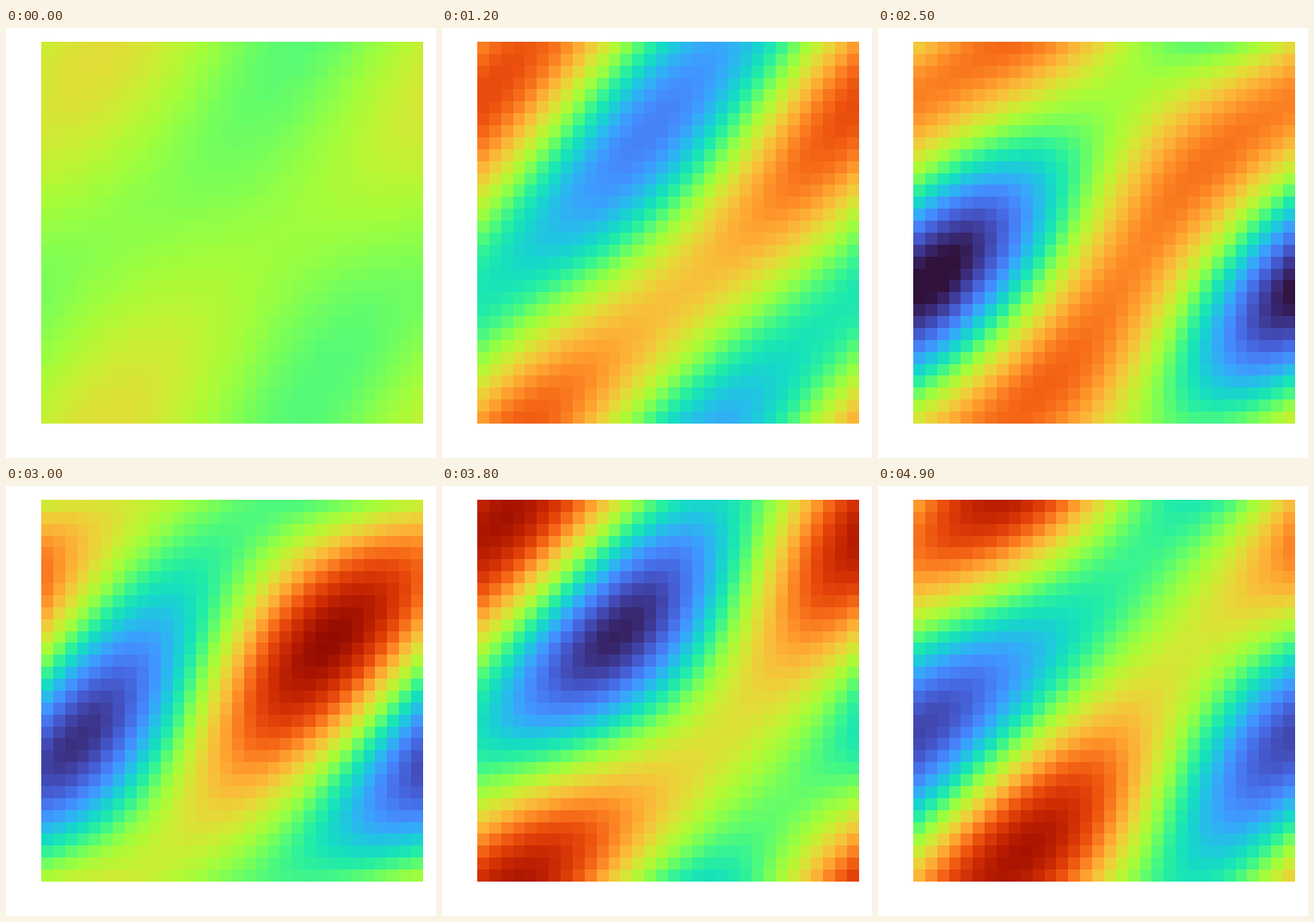
A matplotlib script for the animation above (5000 ms loop, 500x500 px).

```python
import numpy as np
import matplotlib.pyplot as plt
from matplotlib.animation import FuncAnimation

SIZE, FRAMES, INTERVAL, CELLS = 500, 50, 100, 32
MEAN = 0.495
RIDGE = 0.172        # where the diagonal wave has its crest, as x + y

# Strength and crest position of the two rocking waves at a few moments
MOMENTS = [0, 12, 20, 30, 38, 42, 49]
X_STRENGTH = [0.040, 0.086, 0.093, 0.163, 0.138, 0.111, 0.107]
X_CREST = [0.17, -0.01, 0.41, 0.68, 0.96, 0.63, 0.385]
Y_STRENGTH = [0.015, 0.022, 0.150, 0.114, 0.140, 0.095, 0.137]
Y_CREST = [0.10, -0.09, -0.04, 0.26, -0.06, -0.24, 0.01]

cell_centres = (np.arange(CELLS) + 0.5) / CELLS
X, Y = np.meshgrid(cell_centres, cell_centres)


def wave(position, crest):
    return np.cos(2 * np.pi * (position - crest))


def track(frame, values):
    return np.interp(frame, MOMENTS, values)


def ridge_strength(frame):
    """Logistic growth of the diagonal wave from a faint start."""
    return 0.25 / (1 + 4 * np.exp(-0.4 * frame))


def field(frame):
    return (MEAN
            + ridge_strength(frame) * wave(X + Y, RIDGE)
            + track(frame, X_STRENGTH) * wave(X, track(frame, X_CREST))
            + track(frame, Y_STRENGTH) * wave(Y, track(frame, Y_CREST)))


fig = plt.figure(figsize=(SIZE / 100, SIZE / 100), dpi=100, facecolor="white")
ax = fig.add_axes([41 / SIZE, 40 / SIZE, 444 / SIZE, 444 / SIZE])
ax.axis("off")
image = ax.imshow(field(0), cmap="turbo", vmin=0, vmax=1,
                  interpolation="nearest", aspect="auto")


def update(frame):
    image.set_data(field(frame))
    return [image]


anim = FuncAnimation(fig, update, frames=FRAMES, interval=INTERVAL,
                     repeat=True, repeat_delay=0)
plt.show()
```
